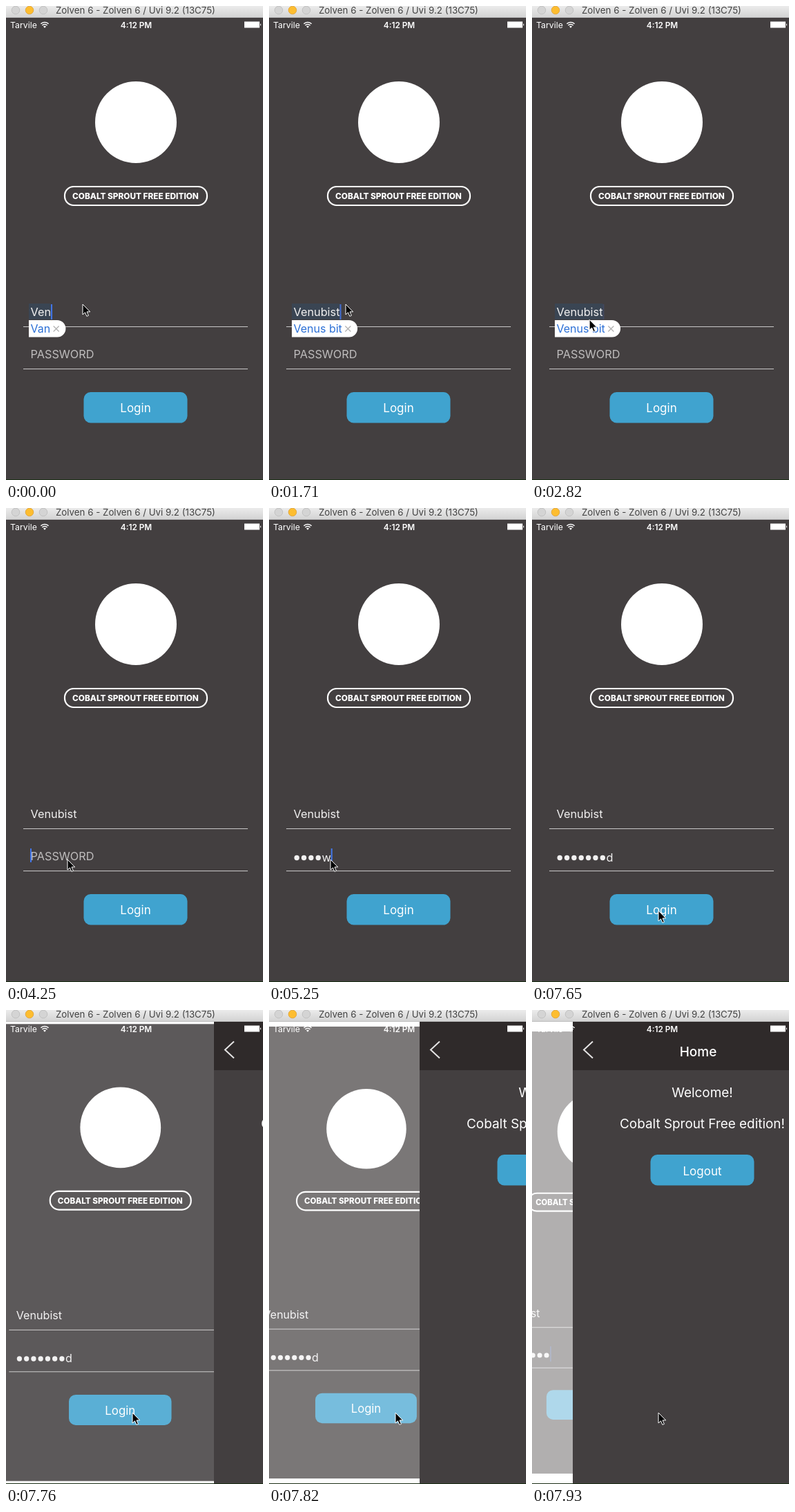
Write an HTML page that moves like this. It is 372 by 685 pixels and loops after 8 s.

```html
<!DOCTYPE html>
<html lang="en">
<head>
<meta charset="utf-8">
<title>Login flow</title>
<style>
  html, body { margin: 0; width: 100%; height: 100%; overflow: hidden; background: #433f40; }
  svg { display: block; width: 372px; height: 685px; font-family: Inter, Roboto, sans-serif; }
  text { fill: #fff; }
  .mid { text-anchor: middle; }
  .field { font-size: 16.3px; fill: #f1f0f0; }
  .button { font-size: 17px; }
  .heading { font-size: 18.9px; }
  .caret { fill: #4377ea; }
</style>
</head>
<body>
<svg viewBox="0 0 372 685">
  <defs>
    <linearGradient id="chrome" x2="0" y2="1">
      <stop stop-color="#ebebeb"/><stop offset="1" stop-color="#d2d2d2"/>
    </linearGradient>
    <rect id="buttonShape" x="112.5" width="150" height="44.5" rx="10" fill="#40a3cf"/>
  </defs>
  <rect width="372" height="685" fill="#fff"/>

  <g id="login">
    <rect y="17" width="375" height="667" fill="#433f40"/>
    <circle cx="188" cy="168" r="59" fill="#fff"/>
    <rect x="85" y="261" width="206" height="27" rx="13" fill="none" stroke="#fff" stroke-width="2.2"/>
    <text class="mid" x="187.5" y="279" font-size="11.8" font-weight="800">COBALT SPROUT FREE EDITION</text>
    <path d="M25 463.5H350M25 524.5H350" stroke="#c9c8c8"/>

    <rect id="marked" x="33" y="430" height="23" fill="#3a4553"/>
    <text id="user" class="field" x="35.5" y="448"></text>
    <rect id="userCaret" class="caret" y="431" width="2" height="22"/>
    <g id="bubble">
      <path id="bubbleShape" fill="#fff"/>
      <text id="hint" font-size="16" x="35.5" y="472" style="fill:#2c70d6"></text>
      <path id="cross" d="M-4 462.5l8 8m0-8l-8 8" stroke="#b0b0b0" stroke-width="1.2"/>
    </g>

    <text id="placeholder" class="field" x="35.5" y="509" style="fill:#bfbdbd">PASSWORD</text>
    <g id="dots" fill="#f1f0f0"></g>
    <text id="lastKey" class="field" y="511"></text>
    <rect id="passCaret" class="caret" y="492" width="2"/>

    <use href="#buttonShape" y="558"/>
    <text class="mid button" x="187.5" y="587">Login</text>
  </g>

  <g id="home">
    <rect y="17" width="375" height="667" fill="#433f40"/>
    <rect y="17" width="375" height="70" fill="#2f2a2a"/>
    <path d="M29 45.5L16 57.5l13 12" fill="none" stroke="#e4e3e3" stroke-width="2"/>
    <text class="mid" x="181.5" y="67" font-size="19" font-weight="500">Home</text>
    <text class="mid heading" x="187.5" y="126">Welcome!</text>
    <text class="mid heading" x="187.5" y="171">Cobalt Sprout Free edition!</text>
    <use href="#buttonShape" y="209"/>
    <text class="mid button" x="187.5" y="238.5">Logout</text>
  </g>

  <g id="status">
    <text x="6" y="31.5" font-size="12.3">Tarvile</text>
    <path d="M50.4 25.8a8 8 0 0 1 11.2 0M52.4 28a5 5 0 0 1 7.2 0" fill="none" stroke="#fff" stroke-width="1.6"/>
    <path d="M54 29.6a3 3 0 0 1 4 0l-2 2.2z" fill="#fff"/>
    <text class="mid" x="188.5" y="31.5" font-size="11.8" font-weight="600">4:12 PM</text>
    <path d="M345 22.5h22v9h-22zM368 25.2a2 2 0 0 1 0 3.6z" fill="#fff"/>
  </g>

  <rect width="372" height="17" fill="url(#chrome)"/>
  <rect y="16" width="372" height="1" fill="#bdbdbd"/>
  <g fill="#d4d4d4" stroke="#bcbcbc" stroke-width=".8">
    <circle cx="14" cy="6" r="5.8"/>
    <circle cx="34" cy="6" r="5.8" fill="#fdbd30" stroke="#dea034"/>
    <circle cx="54" cy="6" r="5.8"/>
  </g>
  <text x="72" y="11" font-size="13.3" style="fill:#424242">Zolven 6 - Zolven 6 / Uvi 9.2 (13C75)</text>
  <rect y="684" width="372" height="1" fill="#1d3018"/>
  <path id="pointer" d="M0 0V15l3.5-3.2 2.4 5.6 2.5-1.1-2.4-5.4h4.7z" fill="#000" stroke="#fff"/>
</svg>

<script>
const LOOP = 8000, USER = 'Venubist', PASSWORD = 'password';
const LEFT = 35.5, DOT_STEP = 10.35;

// [time, suggestion]; each entry also types one more letter after the first three
const HINTS = [[0, 'Van'], [110, 'Vent'], [410, 'Venus'], [650, 'Verbs'], [880, 'Venus bi'], [1170, 'Venus bit']];
const COMMIT = 3300, FOCUS = 3540, MASK_ALL = 7900;
const KEYS = [4360, 4540, 4830, 5010, 5250, 5490, 5730, 5970];
const SLIDE = [7760, 7820, 7870, 7930], SLIDE_START = 7628, SLIDE_TIME = 420;
// [start, end, x, y]
const MOVES = [[0, 0, 111, 431], [2180, 2470, 82, 443], [2650, 3330, 89, 508], [6600, 7130, 183, 582]];

const $ = id => document.getElementById(id);
const set = (id, attrs) => { for (const k in attrs) $(id).setAttribute(k, attrs[k]); };
const show = (id, on) => set(id, { visibility: on ? 'visible' : 'hidden' });
const clamp = v => Math.min(1, Math.max(0, v));
const smooth = v => v * v * (3 - 2 * v);
const width = id => $(id).textContent ? $(id).getComputedTextLength() : 0;

$('dots').innerHTML = [...PASSWORD].map((_, i) =>
  `<circle cx="${40.2 + i * DOT_STEP}" cy="505.5" r="3.7"/>`).join('');

function blink(age) {
  if (age < 520) return 1;
  const phase = (age - 520) % 1000;
  return phase < 400 ? 1 - clamp(phase / 160) : clamp((phase - 400) / 120);
}

function drawUser(t) {
  const step = HINTS.filter(h => h[0] <= t).length - 1;
  const composing = t < COMMIT;
  $('user').textContent = USER.slice(0, step + 3);
  $('hint').textContent = HINTS[step][1];
  const caretX = LEFT + width('user');
  const hintEnd = LEFT + width('hint');
  set('marked', { width: caretX - 33 });
  set('userCaret', { x: caretX, opacity: t < FOCUS ? blink(t - HINTS[step][0]) : 0 });
  set('bubbleShape', { d: `M33 454H${hintEnd + 10}a12.25 12.25 0 0 1 0 24.5H33z` });
  set('cross', { transform: `translate(${hintEnd + 8.5})` });
  show('marked', composing);
  show('bubble', composing);
}

function drawPassword(t) {
  const typed = KEYS.filter(k => k <= t).length;
  const masked = t >= MASK_ALL ? typed : Math.max(0, typed - 1);
  [...$('dots').children].forEach((dot, i) =>
    dot.setAttribute('visibility', i < masked ? 'visible' : 'hidden'));
  show('placeholder', !typed);
  $('lastKey').textContent = PASSWORD.slice(masked, typed);
  const keyX = LEFT + masked * DOT_STEP - .5;
  set('lastKey', { x: keyX });
  set('passCaret', {
    x: keyX + width('lastKey'),
    height: typed ? 23 : 20,
    opacity: t < FOCUS ? 0 : blink(t - (typed ? KEYS[typed - 1] : FOCUS + 200))
  });
}

function drawSlide(t) {
  const tick = SLIDE.filter(s => s <= t).pop() || 0;
  const u = clamp((tick - SLIDE_START) / SLIDE_TIME);
  const p = u < .5 ? 2 * u * u : 1 - 2 * (1 - u) ** 2;
  set('login', {
    transform: `translate(${187.5 - 112.5 * p} 350.5) scale(${1 - .05 * p}) translate(-187.5 -350.5)`,
    opacity: 1 - .7 * p
  });
  set('home', { transform: `translate(${Math.round(375 * (1 - p))})` });
}

function drawPointer(t) {
  let [, , x, y] = MOVES[0];
  for (const [start, end, toX, toY] of MOVES.slice(1)) {
    const k = smooth(clamp((t - start) / (end - start)));
    x += (toX - x) * k;
    y += (toY - y) * k;
  }
  set('pointer', { transform: `translate(${x} ${y})` });
}

const origin = performance.now();
function frame() {
  const t = (performance.now() - origin) % LOOP;
  drawUser(t);
  drawPassword(t);
  drawSlide(t);
  drawPointer(t);
  requestAnimationFrame(frame);
}
frame();
</script>
</body>
</html>
```
